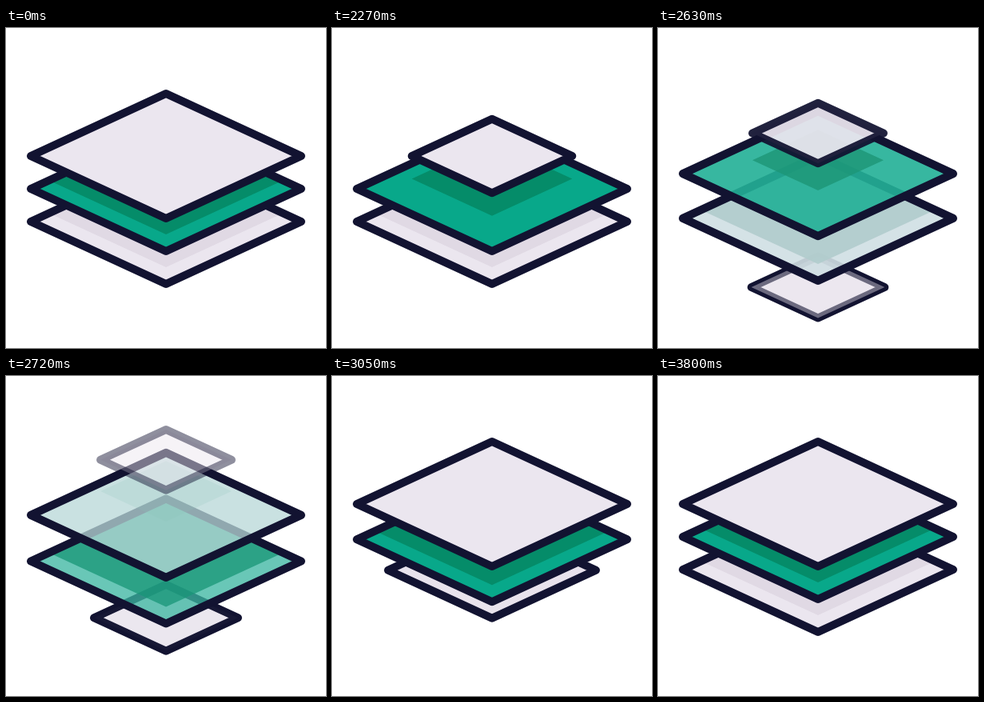
An HTML page with a canvas that plays this animation: 400x400 px, repeating every 3830 ms.

```html
<!DOCTYPE html>
<html>
<head>
<meta charset="utf-8">
<title>Layers</title>
<style>
  html, body { margin: 0; width: 100%; height: 100%; overflow: hidden; background: #fff; }
  canvas { display: block; }
</style>
</head>
<body>
<canvas id="stage" width="400" height="400"></canvas>
<script>
const ctx = document.getElementById('stage').getContext('2d');
const LOOP = 3830, START = 2030, STEP = 30;
const INK = '#121331';
const PALE = { fill: '#ebe6ef', shade: '#e0d9e4' };
const GREEN = { fill: '#08a88a', shade: '#058c69' };

const ramp = (t, from, span) => Math.min(1, Math.max(0, (t - from) / span));
const smooth = (t, from, span) => {
  const x = ramp(t, from, span);
  return x * x * (3 - 2 * x);
};
// Quick start with a long, soft landing.
const settle = (t, from, span) => {
  const x = ramp(t, from, span), n = 3.2;
  return 1 - (1 - x) ** n * (1 + n * x);
};
const mix = (a, b, p) => a + (b - a) * p;

function diamond(y, scale) {
  const w = 169 * scale, h = 78 * scale;
  ctx.beginPath();
  ctx.moveTo(200 - w, y);
  ctx.lineTo(200, y - h);
  ctx.lineTo(200 + w, y);
  ctx.lineTo(200, y + h);
  ctx.closePath();
}

function face(y, scale, colors, alpha, shadow) {
  if (alpha <= 0) return;
  ctx.save();
  ctx.globalAlpha = alpha;
  diamond(y, scale);
  ctx.fillStyle = colors.fill;
  ctx.fill();
  if (shadow && shadow.alpha > 0) {
    ctx.clip();
    ctx.globalAlpha = alpha * shadow.alpha;
    diamond(y + shadow.dy, shadow.scale);
    ctx.fillStyle = colors.shade;
    ctx.fill();
  }
  ctx.restore();
}

function outline(y, scale, alpha = 1) {
  ctx.globalAlpha = alpha;
  diamond(y, scale);
  ctx.stroke();
  ctx.globalAlpha = 1;
}

function draw(t) {
  ctx.fillStyle = '#fff';
  ctx.fillRect(0, 0, 400, 400);
  ctx.lineWidth = 10;
  ctx.lineJoin = 'round';
  ctx.strokeStyle = INK;

  const swap = smooth(t, 2580, 250);
  const fullShadow = { dy: -21, scale: 1, alpha: 1 };

  // New sheet rising from below
  const inAlpha = ramp(t, 2545, 85);
  if (inAlpha > 0) {
    const y = mix(361, 242, smooth(t, 2363, 720));
    const scale = mix(0.48, 1, settle(t, 2550, 1250));
    face(y, scale, PALE, inAlpha, { ...fullShadow, alpha: smooth(t, 2900, 400) });
    outline(y, scale, inAlpha);
    face(y, scale, PALE, inAlpha * (1 - smooth(t, 2490, 250)));
  }

  // Bottom sheet becomes the green middle one
  const lowY = mix(242, 201, smooth(t, 2500, 665));
  face(lowY, 1, PALE, 1 - swap, fullShadow);
  face(lowY, 1, GREEN, swap, fullShadow);
  outline(lowY, 1);

  // Top sheet shrinks, then lifts off and fades
  const outScale = mix(1, 0.485, settle(t, 2010, 470));
  const lift = 28.5 * (Math.max(0, t - 2400) / 230) ** 2;
  const outAlpha = 1 - smooth(t, 2590, 250);

  // Green middle sheet becomes the pale top one
  const midY = mix(201, 160, smooth(t, 2317, 661));
  const gap = midY - (160 - lift) - 41;
  face(midY, 1, GREEN, 1 - swap, { dy: -21 * outScale - 0.7 * gap, scale: outScale, alpha: outAlpha });
  face(midY, 1, PALE, swap);
  outline(midY, 1);

  if (outAlpha > 0) {
    face(160 - lift, outScale, PALE, outAlpha);
    outline(160 - lift, outScale, outAlpha);
  }
}

function tick() {
  const t = performance.now() % LOOP;
  draw(t < START ? 0 : START + Math.floor((t - START) / STEP) * STEP);
  requestAnimationFrame(tick);
}
tick();
</script>
</body>
</html>
```
